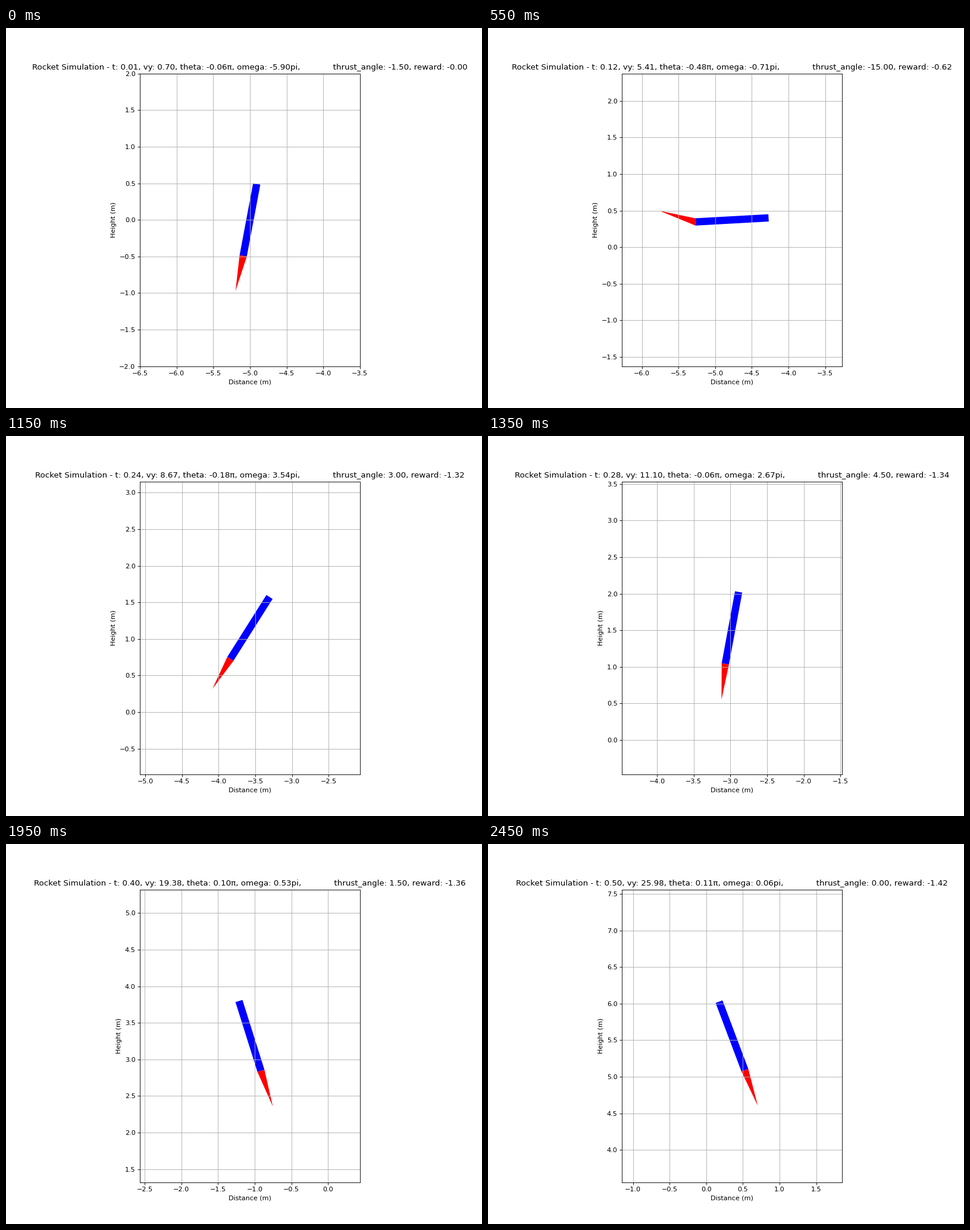
Write a matplotlib script that moves like this. It is 800 by 640 pixels and loops after 2.5 s.

```python
import numpy as np
import matplotlib.pyplot as plt
from matplotlib.animation import FuncAnimation
from matplotlib.patches import Polygon

DT = 0.01
GRAVITY = 9.81
THRUST = 80.0                      # per unit of mass
LENGTH, WIDTH, FLAME = 1.0, 0.1, 0.5
SPIN_GAIN = 12 * THRUST / (LENGTH**2 + WIDTH**2)
GIMBAL_STEP = 1.5                  # degrees

# Steering commands as (direction, number of steps)
COMMANDS = [(-1, 11), (1, 14), (0, 9), (-1, 2), (0, 9), (-1, 1), (0, 4)]


def simulate():
    """Return one state per step: t, x, y, vy, theta, omega, gimbal, reward."""
    x, y, vx, vy = -5.0, 0.0, 0.0, 0.0
    theta, omega = 0.0, -5.8984 * np.pi
    gimbal, reward = 0.0, 0.0
    states = []
    steps = [d for d, count in COMMANDS for _ in range(count)]
    for i, direction in enumerate(steps):
        delta = np.radians(gimbal)
        x += vx * DT
        y += vy * DT
        vx -= THRUST * np.sin(theta - delta) * DT
        vy += (THRUST * np.cos(theta - delta) - GRAVITY) * DT
        omega -= SPIN_GAIN * np.sin(delta) * DT
        theta += omega * DT
        gimbal += GIMBAL_STEP * direction
        reward -= 0.1 * (1 - np.cos(theta))
        states.append(((i + 1) * DT, x, y, vy, theta, omega, gimbal, reward))
    return states


def rocket_shapes(x, y, theta, gimbal):
    """Corner points of the body and of the flame."""
    centre = np.array([x, y])
    up = np.array([-np.sin(theta), np.cos(theta)]) * LENGTH / 2
    side = np.array([np.cos(theta), np.sin(theta)]) * WIDTH / 2
    left, right = centre - up - side, centre - up + side
    body = [left, right, centre + up + side, centre + up - side]
    angle = theta + np.radians(gimbal)
    tip = [(centre - up)[0] + FLAME * np.sin(angle),
           left[1] - FLAME * np.cos(angle)]
    return body, [left, right, tip]


states = simulate()

fig, ax = plt.subplots(figsize=(10, 8), dpi=80)
ax.set_aspect("equal")
ax.set_xlabel("Distance (m)")
ax.set_ylabel("Height (m)")
ax.grid(True)
body = ax.add_patch(Polygon(np.zeros((4, 2)), fc="blue", lw=0))
flame = ax.add_patch(Polygon(np.zeros((3, 2)), fc="red", lw=0))


def update(i):
    t, x, y, vy, theta, omega, gimbal, reward = states[i]
    body_xy, flame_xy = rocket_shapes(x, y, theta, gimbal)
    body.set_xy(body_xy)
    flame.set_xy(flame_xy)
    ax.set_xlim(x - 1.5, x + 1.5)
    ax.set_ylim(y - 2, y + 2)
    ax.set_title(
        f"Rocket Simulation - t: {t:.2f}, vy: {vy:.2f}, "
        f"theta: {theta / np.pi:.2f}π, omega: {omega / np.pi:.2f}pi,"
        + " " * 13 +
        f"thrust_angle: {gimbal:.2f}, reward: {reward:.2f}")
    return body, flame


anim = FuncAnimation(fig, update, frames=len(states), interval=50,
                     repeat=True, repeat_delay=0, blit=False)
plt.show()
```
